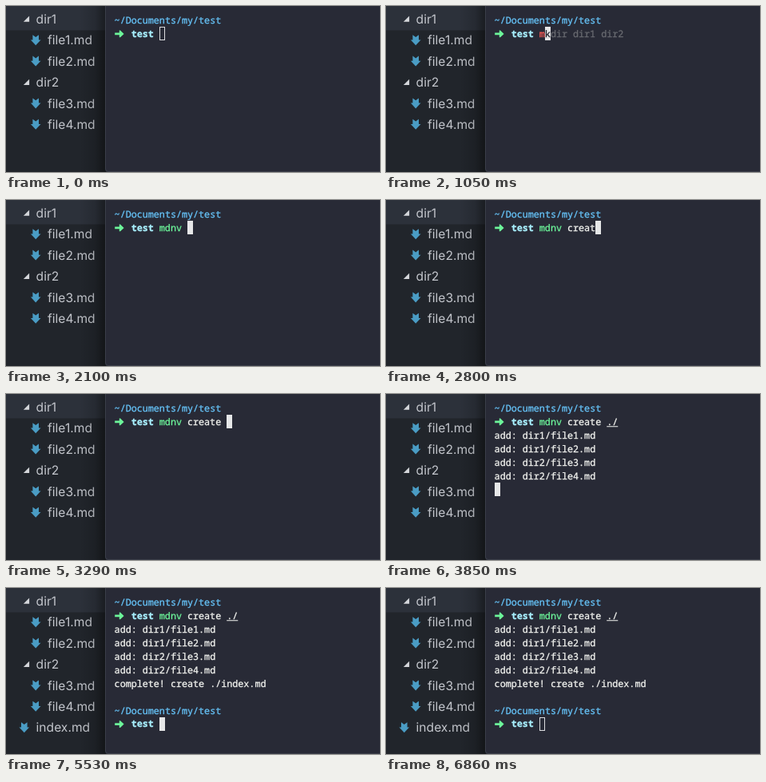
An HTML page for the animation above (7.07 s loop, 468x208 px).

```html
<!DOCTYPE html>
<html lang="en">
<head>
<meta charset="utf-8">
<title>Terminal demo</title>
<style>
  html, body { margin: 0; width: 100%; height: 100%; overflow: hidden; background: #20242b; }
  svg { display: block; width: 468px; height: 208px; }
  text { white-space: pre; text-rendering: geometricPrecision; }
  #tree text { font: 15.6px Inter, sans-serif; fill: #c3c6cc; }
  #term text { font: 11.72px "Noto Sans Mono", monospace; fill: currentColor; stroke: currentColor; stroke-width: .3px; }
  #term { color: #f4f5f1; }
  #term .bold { font-weight: 600; }
  #term .path { color: #66c3f8; }
  #term .dir { color: #a8effd; }
  #term .ok { color: #6cf59a; }
  #term .bad { color: #ff5c57; }
  #term .hint { color: #686a70; }
  #term .under { color: #20222b; }
  .icon { fill: #4a9cc4; }
</style>
</head>
<body>
<svg viewBox="0 0 468 208">
  <defs>
    <linearGradient id="shade">
      <stop offset="0" stop-color="#000" stop-opacity="0"/>
      <stop offset=".6" stop-color="#000" stop-opacity=".14"/>
      <stop offset="1" stop-color="#000" stop-opacity=".45"/>
    </linearGradient>
    <path id="md" d="M-3.8-6.4L0-3.6 3.8-6.4V-.2H6.3L0 6.6-6.3-.2h2.5z"/>
    <path id="open" d="M3.6-3.6v7.2h-7.2z"/>
    <path id="arrow" d="M0-1.4h5.6v-3h1.2L11.4 0 6.8 4.4H5.6v-3H0z"/>
  </defs>
  <rect width="125" height="208" fill="#21252b"/>
  <rect width="125" height="30.5" fill="#2c313a"/>
  <g id="tree"></g>
  <rect x="92" width="33" height="208" fill="url(#shade)"/>
  <path d="M124 0H468V208H128Q124 208 124 204z" fill="#282a36"/>
  <path d="M124.5 0V204Q124.5 207.5 128 207.5H468" fill="none" stroke="#3a3e49"/>
  <g id="term"></g>
</svg>
<script>
const LOOP = 7070, STEP = 70, CELL = 7.03, LEFT = 135.6, PITCH = 16.95;
const NS = 'http://www.w3.org/2000/svg';
const tree = document.getElementById('tree');
const term = document.getElementById('term');

const typing = [
  [0, ''], [910, 'm'], [1190, 'md'], [1330, 'mdn'], [1610, 'mdnv'], [1820, 'mdnv '],
  [2450, 'mdnv c'], [2520, 'mdnv cr'], [2590, 'mdnv cre'], [2730, 'mdnv crea'],
  [2800, 'mdnv creat'], [2940, 'mdnv create'], [3150, 'mdnv create '],
  [3430, 'mdnv create .'], [3500, 'mdnv create ./']
];
const output = [
  [3780, 'add: dir1/file1.md'], [3780, 'add: dir1/file2.md'],
  [3850, 'add: dir2/file3.md'], [3850, 'add: dir2/file4.md'],
  [3920, 'complete! create ./index.md']
];
const FOCUS = 70, HINT = 980, VALID = 1680, ENTER = 3710, DONE = 3990, INDEX = 5040, BLUR = 6580;

function add(parent, tag, attrs, text) {
  const el = document.createElementNS(NS, tag);
  for (const key in attrs) el.setAttribute(key, attrs[key]);
  if (text !== undefined) el.textContent = text;
  return parent.appendChild(el);
}

const colX = col => LEFT + col * CELL;
const rowY = row => 18 + row * PITCH;

function put(row, col, text, cls = '') {
  add(term, 'text', { x: colX(col), y: rowY(row) + 3.9, class: cls }, text);
}

function prompt(row) {
  put(row, 0, '~/Documents/my/test', 'path');
  add(term, 'use', { href: '#arrow', x: 136.2, y: rowY(row + 1), class: 'ok', fill: 'currentColor' });
  put(row + 1, 3, 'test', 'dir bold');
}

function cursor(row, col, solid) {
  const x = Math.round(colX(col)), y = Math.round(rowY(row)) - 9;
  add(term, 'rect', solid
    ? { x, y, width: 7, height: 17, fill: '#e6e7e8' }
    : { x: x + .5, y: y + .5, width: 6, height: 16, fill: 'none', stroke: '#dcdde0' });
}

function command(line, t) {
  const path = line.slice(12);
  put(1, 8, line.slice(0, 4), t >= VALID ? 'ok' : 'bad');
  put(1, 13, line.slice(5, 11));
  put(1, 20, path);
  add(term, 'rect', { x: colX(20), y: rowY(1) + 5.3, width: path.length * CELL, height: 1, fill: 'currentColor' });
}

function drawTerm(t) {
  term.textContent = '';
  const solid = t >= FOCUS && t < BLUR;
  const line = typing.filter(k => k[0] <= t).pop()[1];
  const shown = output.filter(k => k[0] <= t);
  prompt(0);
  if (t >= DONE) {
    prompt(8);
    cursor(9, 8, solid);
  } else if (t >= ENTER) {
    cursor(2 + shown.length, 0, solid);
  } else {
    cursor(1, 8 + line.length, solid);
  }
  command(line, t);
  if (line === 'm' && t >= HINT) {
    put(1, 9, 'k', 'under');
    put(1, 10, 'dir dir1 dir2', 'hint');
  }
  shown.forEach((k, i) => put(2 + i, 0, k[1]));
}

const entries = ['dir1', ' file1.md', ' file2.md', 'dir2', ' file3.md', ' file4.md', 'index.md'];
const rows = entries.map((name, i) => {
  const g = add(tree, 'g', { transform: `translate(0 ${16.2 + i * 26.4})` });
  const nested = name[0] === ' ';
  if (name.startsWith('dir')) add(g, 'use', { href: '#open', x: 25.5, y: 0, fill: '#d4d6da' });
  else add(g, 'use', { href: '#md', x: nested ? 37.2 : 22.8, y: 0, class: 'icon' });
  add(g, 'text', { x: nested ? 52 : 37.6, y: 5.8 }, name.trim());
  return g;
});

let last = -1;
function frame(now) {
  const t = Math.floor((now % LOOP) / STEP) * STEP;
  if (t !== last) {
    last = t;
    drawTerm(t);
    rows[6].setAttribute('visibility', t >= INDEX ? 'visible' : 'hidden');
  }
  requestAnimationFrame(frame);
}
frame(0);
</script>
</body>
</html>
```
